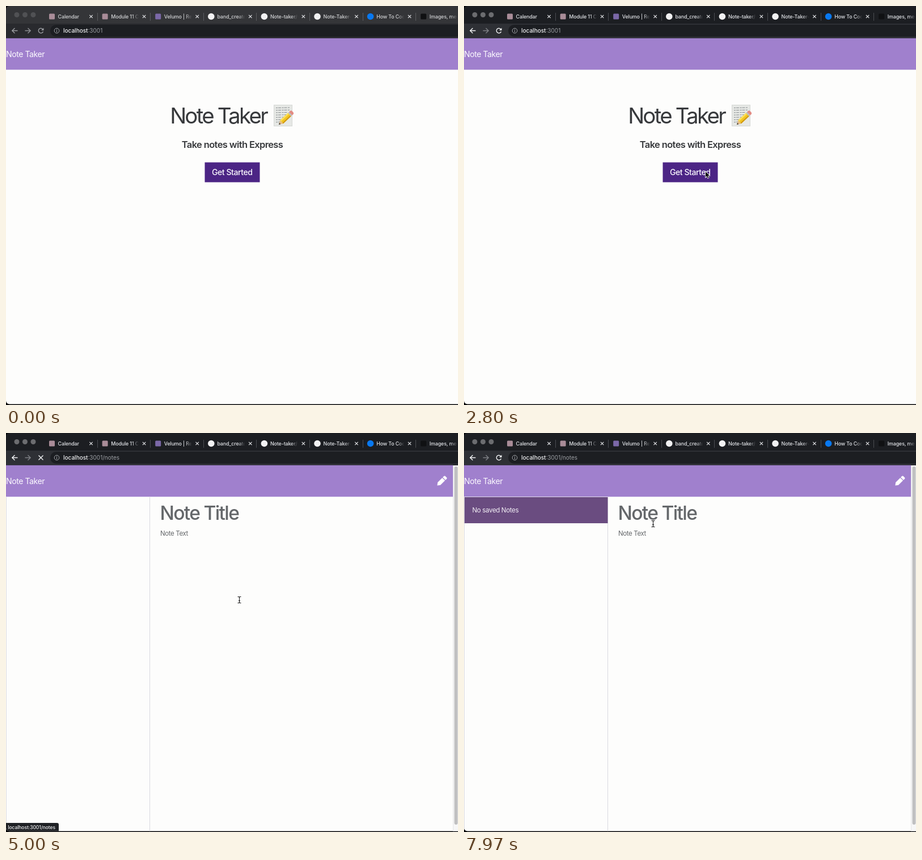
Write an HTML page with a canvas that moves like this. It is 797 px wide and 703 px high and loops after 8000 ms.

```html
<!DOCTYPE html>
<html lang="en">
<head>
<meta charset="utf-8">
<title>Note Taker</title>
<style>
html, body { margin: 0; width: 100%; height: 100%; overflow: hidden; background: #000; }
canvas { display: block; width: 797px; height: 703px; }
</style>
</head>
<body>
<canvas id="stage" width="797" height="703"></canvas>
<script>
const W = 797, H = 703, LOOP = 8000;
const ctx = document.getElementById('stage').getContext('2d');

// Moments of the hard changes, in ms
const FOCUS = 2200, STATUS_ON = 4350, OPEN = 4500, LOADED = 5250, STATUS_OFF = 5500;

// Pointer path: time, x, y
const PATH = [
  [600, 690, 703], [850, 468, 302], [1500, 429, 290], [2500, 429, 290],
  [3500, 417, 299], [4000, 417, 299], [4400, 411, 294], [6850, 411, 294],
  [7550, 339, 238], [7900, 333, 160], [8000, 333, 160]
];

const TABS = [
  ['Calendar', '#a98c98', 'square'],
  ['Module 11 Co', '#a98c98', 'square'],
  ['Velumo | Rem', '#7b68a8', 'square'],
  ['band_creator', '#f1f1f2', 'circle'],
  ['Note-taker/se', '#f1f1f2', 'circle'],
  ['Note-Taker-A', '#f1f1f2', 'circle'],
  ['How To Code', '#0878f0', 'circle'],
  ['Images, media', '#101113', 'square']
];

function rect(x, y, w, h, color) {
  ctx.fillStyle = color;
  ctx.fillRect(x, y, w, h);
}

function round(x, y, w, h, r, color) {
  ctx.fillStyle = color;
  ctx.beginPath();
  ctx.roundRect(x, y, w, h, r);
  ctx.fill();
}

function circle(x, y, r, color) {
  ctx.fillStyle = color;
  ctx.beginPath();
  ctx.arc(x, y, r, 0, Math.PI * 2);
  ctx.fill();
}

function poly(points, fill, stroke, width = 1) {
  ctx.beginPath();
  points.forEach(([x, y]) => ctx.lineTo(x, y));
  ctx.closePath();
  if (stroke) {
    ctx.strokeStyle = stroke;
    ctx.lineWidth = width;
    ctx.stroke();
  }
  ctx.fillStyle = fill;
  ctx.fill();
}

function lines(color, width, ...paths) {
  ctx.strokeStyle = color;
  ctx.lineWidth = width;
  ctx.beginPath();
  for (const path of paths) {
    path.forEach(([x, y], i) => i ? ctx.lineTo(x, y) : ctx.moveTo(x, y));
  }
  ctx.stroke();
}

function text(str, x, y, size, color, { weight = 400, track = -0.033, align = 'left' } = {}) {
  ctx.font = `${weight} ${size}px Inter, "Liberation Sans", sans-serif`;
  ctx.letterSpacing = `${(size * track).toFixed(3)}px`;
  ctx.textAlign = align;
  ctx.fillStyle = color;
  ctx.fillText(str, x, y);
}

function cross(x, y, r, color, width) {
  lines(color, width, [[x - r, y - r], [x + r, y + r]], [[x + r, y - r], [x - r, y + r]]);
}

function arrowIcon(x, y, dir, color) {
  lines(color, 1.4, [[x - 5 * dir, y], [x + 5 * dir, y]],
    [[x, y - 4.5], [x + 4.7 * dir, y], [x, y + 4.5]]);
}

function reloadIcon(x, y, color) {
  ctx.strokeStyle = color;
  ctx.lineWidth = 1.4;
  ctx.beginPath();
  ctx.arc(x, y, 4.2, 0.35, Math.PI * 1.78);
  ctx.stroke();
  poly([[x + 5, y - 5], [x + 5, y - 0.6], [x + 0.6, y - 0.6]], color);
}

function drawTab([label, color, shape], i, active, strip) {
  const x = 81 + i * 93.6;
  if (shape === 'circle') circle(x, 18.5, 5.8, color);
  else round(x - 5, 13.5, 10, 10, 1.5, color);

  const left = x + 10.6;
  ctx.save();
  ctx.beginPath();
  ctx.rect(left, 8, 49, 20);
  ctx.clip();
  text(label, left, 21.5, 8.9, active ? '#e2e4e8' : '#d3d4d6', { weight: 500, track: -0.015 });
  ctx.restore();

  if (i) {
    const fade = ctx.createLinearGradient(left + 37, 0, left + 49, 0);
    fade.addColorStop(0, strip + '00');
    fade.addColorStop(1, strip);
    rect(left + 37, 9, 13, 18, fade);
  }
  cross(x + 69, 18.5, 2.7, '#e3e4e7', 1.2);
  rect(Math.round(x + 79.5), 12, 1, 14, active ? '#4b4d52' : '#5b5c60');
}

function drawBrowser(t) {
  const active = t >= FOCUS;
  const strip = active ? '#1c1e22' : '#343538';
  const icon = active ? '#f2f3f5' : '#9a9ca0';
  rect(0, 0, W, 31, strip);
  rect(0, 31, W, 25.5, active ? '#2e3035' : '#292a2e');
  [19, 33.5, 48].forEach(x => circle(x, 15.5, 4.5, active ? '#6b6c6f' : '#505154'));
  TABS.forEach((tab, i) => drawTab(tab, i, active, strip));

  arrowIcon(15.5, 43.5, -1, icon);
  arrowIcon(38.5, 43.5, 1, active ? '#7d7f84' : '#8c8e92');
  if (t >= OPEN && t < LOADED) cross(61.5, 43.5, 4, icon, 1.4);
  else reloadIcon(61.5, 43.5, icon);

  round(78, 33, 740, 21, 10.5, '#1c1e22');
  ctx.strokeStyle = '#a5a8ad';
  ctx.lineWidth = 1;
  ctx.beginPath();
  ctx.arc(89.5, 43.5, 4.3, 0, Math.PI * 2);
  ctx.stroke();
  rect(89, 42.7, 1, 3.3, '#a5a8ad');
  rect(89, 40.8, 1, 1.1, '#a5a8ad');

  const host = 'localhost';
  text(host, 101, 47, 10, '#f0f1f3', { weight: 500, track: 0 });
  const end = 101 + ctx.measureText(host).width;
  text(t >= OPEN ? ':3001/notes' : ':3001', end, 47, 10, '#9da0a5', { track: 0 });
}

function drawMemo() {
  rect(472, 174, 33, 38, '#d5d8d5');
  rect(473, 175, 31, 36, '#e6e8e5');
  for (let i = 0; i < 7; i++) {
    const y = 179.5 + i * 4.2;
    const end = 500 - Math.max(0, i - 1) * 3.4 + (i % 2);
    ctx.setLineDash([3, 1, 5, 1.5]);
    lines('#868b8e', 1, [[476, y], [end, y - 0.5]]);
  }
  ctx.setLineDash([]);

  ctx.save();
  ctx.translate(481, 209);
  ctx.rotate(-0.75);
  poly([[0, 0], [7, -4], [7, 4]], '#e6bd87');
  poly([[0, 0], [3, -1.7], [3, 1.7]], '#3c3834');
  rect(7, -4, 19, 8, '#f2c522');
  rect(7, -4, 19, 2.5, '#fbe05b');
  rect(7, 2, 19, 2, '#cf9714');
  rect(26, -4, 2.5, 8, '#b9bcbd');
  round(28.5, -4, 5, 8, [0, 3, 3, 0], '#e28b83');
  ctx.restore();
}

function drawHome() {
  text('Note Taker', 374.5, 207, 38.5, '#37393c', { track: -0.072, align: 'center' });
  drawMemo();
  text('Take notes with Express', 399, 249.5, 16.5, '#37393c', { weight: 600, track: -0.038, align: 'center' });
  rect(350.5, 275.5, 97, 35, '#4c2585');
  text('Get Started', 398.7, 298, 14.1, '#fbfaff', { weight: 500, align: 'center' });
}

function drawPencil() {
  ctx.save();
  ctx.translate(760, 93);
  ctx.rotate(-Math.PI / 4);
  poly([[0.6, 0], [5, -3.4], [16.5, -3.4], [16.5, 3.4], [5, 3.4]], '#fff');
  round(17.7, -3.4, 4.6, 6.8, [0, 1.6, 1.6, 0], '#fff');
  ctx.restore();
}

function drawNotes(t) {
  drawPencil();
  rect(788, 57, 9, 645, '#f7f7f7');
  rect(788, 57, 1, 645, '#e6e6e8');
  round(790.5, 59, 6, 631, 3, '#c0c0c1');
  rect(0, 113, 1, 589, '#dcdce2');
  rect(253, 113, 1, 589, '#d9d9e0');
  if (t >= LOADED) {
    rect(1, 113, 252.5, 46, '#6a4c80');
    text('No saved Notes', 14.5, 139.5, 11.6, '#f3eff6');
  }
  text('Note Title', 271.5, 153, 33.6, '#64676a', { weight: 500, track: -0.05 });
  text('Note Text', 272, 181, 11.5, '#64676a');
}

function drawStatus() {
  round(0, 687, 93, 15, [0, 3, 0, 0], '#1f2125');
  text('localhost:3001/notes', 3.5, 698, 8.5, '#f0f1f3', { weight: 500, track: -0.01 });
}

function pointerAt(t) {
  const i = PATH.findIndex(p => p[0] > t);
  if (i < 1) return null;
  const [t0, x0, y0] = PATH[i - 1], [t1, x1, y1] = PATH[i];
  const u = (t - t0) / (t1 - t0), k = u * u * (3 - 2 * u);
  return [x0 + (x1 - x0) * k, y0 + (y1 - y0) * k];
}

function drawPointer(t) {
  const at = pointerAt(t);
  if (!at) return;
  ctx.save();
  ctx.translate(Math.round(at[0]), Math.round(at[1]));
  if (t < OPEN) {
    poly([[0, 0], [0, 9.6], [2.2, 7.6], [3.8, 11.2], [5.5, 10.4], [3.9, 6.9], [6.9, 6.8]],
      '#0b0b0b', '#f5f5f5', 1.6);
  } else {
    const beam = [[[-3, -5.5], [-1, -5.5], [0, -4.5], [1, -5.5], [3, -5.5]],
      [[0, -4.5], [0, 4.5]],
      [[-3, 5.5], [-1, 5.5], [0, 4.5], [1, 5.5], [3, 5.5]],
      [[-1.5, 1.5], [1.5, 1.5]]];
    ctx.translate(0.5, 0);
    lines('#ffffff', 2.6, ...beam);
    lines('#1c1c1c', 1.1, ...beam);
  }
  ctx.restore();
}

function draw(t) {
  const notes = t >= OPEN;
  rect(0, 0, W, H, '#050506');
  ctx.save();
  ctx.beginPath();
  ctx.roundRect(0, 0, W + 20, 701.5, 6);
  ctx.clip();
  rect(0, 57, W, 645, '#fdfdfc');
  rect(0, 56.5, notes ? 788 : W, 55.8, '#a080cd');
  text('Note Taker', 0, 90, 14.1, '#fcfaff');
  drawBrowser(t);
  if (notes) drawNotes(t);
  else drawHome();
  if (t >= STATUS_ON && t < STATUS_OFF) drawStatus();
  drawPointer(t);
  ctx.restore();
}

function frame() {
  draw(performance.now() % LOOP);
  requestAnimationFrame(frame);
}
frame();
</script>
</body>
</html>
```
